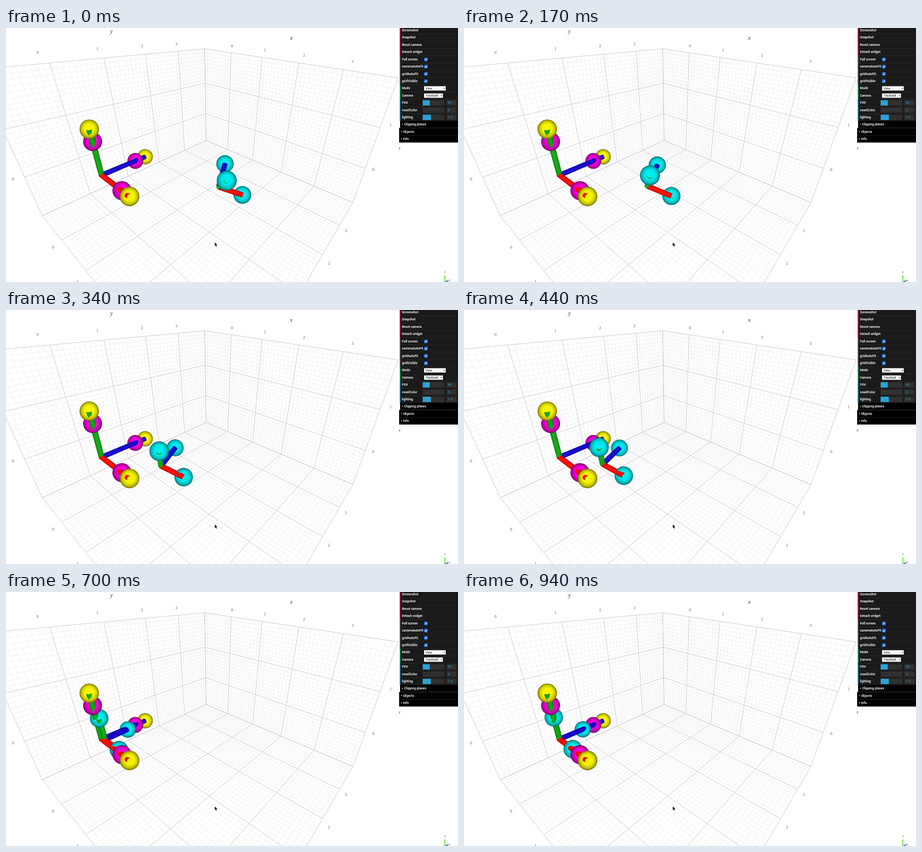
An HTML page with a canvas for the animation above (980 ms loop, 960 by 540 pixels).

```html
<!DOCTYPE html>
<html lang="en">
<head>
<meta charset="utf-8">
<title>Frame alignment</title>
<style>
  html, body { margin: 0; width: 100%; height: 100%; overflow: hidden; background: #fff; }
  canvas { position: absolute; left: 0; top: 0; }
</style>
</head>
<body>
<canvas id="scene" width="960" height="540"></canvas>
<canvas id="objects" width="960" height="540"></canvas>
<script>
const LOOP = 980, FOCAL = 523.5;
const scene = document.getElementById('scene').getContext('2d');
const objects = document.getElementById('objects').getContext('2d');

// Camera: world to view space, view space to screen
const rotate = ([x, y, z]) => [
  .778 * x + .627 * y + .038 * z,
  .337 * x - .3625 * y - .8687 * z,
  -.5296 * x + .69 * y - .493 * z
];
const add = (a, b, k = 1) => a.map((v, i) => v + b[i] * k);
const toView = p => add(rotate(p), [-2.607, .403, 4.929]);
const toScreen = ([x, y, z]) => [480 + FOCAL * x / z, 270 + FOCAL * y / z];
const cross = (a, b) => [a[1] * b[2] - a[2] * b[1], a[2] * b[0] - a[0] * b[2], a[0] * b[1] - a[1] * b[0]];
const unit = a => a.map(v => v / Math.hypot(...a));
const shade = (rgb, k) => `rgb(${rgb.map(v => v * k | 0)})`;

function path(ctx, points) {
  ctx.beginPath();
  points.forEach(p => ctx.lineTo(...p));
}

// Static scene: grid, labels, panel
function gridLines(step, skip, color, width) {
  scene.strokeStyle = color;
  scene.lineWidth = width;
  const line = (a, b) => { path(scene, [a, b].map(p => toScreen(toView(p)))); scene.stroke(); };
  for (let i = 0; i <= 5 / step; i++) {
    if (skip && i % skip === 0) continue;
    const k = i * step - 1;
    line([k, 4, -1], [k, -1, -1]);
    line([-1, k, -1], [4, k, -1]);
    line([k, 4, -1], [k, 4, 2]);
    line([-1, k, -1], [-1, k, 2]);
    if (k <= 2) {
      line([-1, 4, k], [4, 4, k]);
      line([-1, 4, k], [-1, -1, k]);
    }
  }
}

function text(str, x, y, font, color, align = 'left') {
  scene.font = font;
  scene.fillStyle = color;
  scene.textAlign = align;
  scene.textBaseline = 'middle';
  scene.fillText(str, x, y);
}

function box(x, y, w, h, color) {
  scene.fillStyle = color;
  scene.fillRect(x, y, w, h);
}

function drawLabels() {
  const labels = [
    [0, 67, 53], [1, 194, 45], [2, 289, 39], [3, 362, 35],
    [0, 480, 39], [1, 550, 48], [2, 633, 59], [3, 736, 72],
    [1, 817, 207], [0, 780, 302], [0, 15, 322],
    [3, 722, 432], [2, 686, 501], [0, 100, 467], [1, 152, 540]
  ];
  for (const [n, x, y] of labels) text(n, x, y, '8px "Liberation Serif", serif', '#444', 'center');
  const italic = size => `italic ${size}px "Liberation Serif", serif`;
  text('y', 224, 8, italic(12), '#333', 'center');
  text('x', 606, 22, italic(12), '#333', 'center');
  text('z', 836, 256, italic(9), '#333', 'center');

  scene.lineWidth = 2.5;
  scene.strokeStyle = '#7be84a';
  path(scene, [[932, 526], [932, 540]]);
  scene.stroke();
  scene.lineWidth = 2;
  scene.strokeStyle = '#3a3ae0';
  path(scene, [[931, 542], [939, 536.5]]);
  scene.stroke();
  text('z', 932.5, 519, italic(8), '#3c8a30', 'center');
  text('y', 941.5, 537, italic(8), '#445', 'center');
}

function drawCursor() {
  path(scene, [[443.5, 456], [443.5, 463.5], [445.2, 462], [446.6, 465], [447.8, 464.4], [446.5, 461.5], [448.8, 461.3]]);
  scene.closePath();
  scene.strokeStyle = '#fff';
  scene.lineWidth = 1;
  scene.stroke();
  scene.fillStyle = '#000';
  scene.fill();
}

function drawPanel() {
  const ROW = 15.42, FONT = '700 6.8px Roboto, sans-serif', BLUE = '#2fa1d6', FIELD = '#303030';
  const rows = ['Screenshot', 'Snapshot', 'Reset camera', 'Detach widget',
    'Full screen', 'cameraAutoFit', 'gridAutoFit', 'gridVisible',
    'Mode', 'Camera', 'FOV', 'voxelColor', 'lighting'];
  const accent = i => i < 4 ? '#e61d5f' : i < 8 ? '#806787' : i < 10 ? '#1ed36f' : BLUE;
  const selects = { Mode: ['View', 46], Camera: ['Trackball', 40] };
  const sliders = { FOV: [15, '60'], voxelColor: [0, '0'], lighting: [17.5, '1.5'] };

  box(836, 0, 124, 198, '#1a1a1a');
  rows.forEach((name, i) => {
    const y = 5 + i * ROW;
    box(836, y - 7.7, 1.7, ROW, accent(i));
    box(837.7, y + 7.2, 122.3, .7, '#2c2c2c');
    text(name, 841, y, FONT, '#eee');
    if (i > 3 && i < 8) {
      scene.fillStyle = '#1a74e0';
      scene.beginPath();
      scene.roundRect(888, y - 3.8, 7.6, 7.6, 1.3);
      scene.fill();
      scene.strokeStyle = '#fff';
      scene.lineWidth = 1.1;
      path(scene, [[889.8, y + .2], [891.3, y + 1.9], [893.9, y - 2]]);
      scene.stroke();
    }
    if (selects[name]) {
      const [value, w] = selects[name];
      box(888, y - 4.6, w, 9.2, '#fff');
      text(value, 891, y + .2, '6.6px Roboto, sans-serif', '#111');
      scene.strokeStyle = '#222';
      scene.lineWidth = 1;
      path(scene, [[883.2 + w, y - 1], [885 + w, y + 1], [886.8 + w, y - 1]]);
      scene.stroke();
    }
    if (sliders[name]) {
      const [fill, value] = sliders[name];
      box(885, y - 5.7, 46, 11.4, FIELD);
      box(885, y - 5.7, fill, 11.4, BLUE);
      box(935, y - 5.7, 22, 11.4, FIELD);
      text(value, 938.5, y, '6.8px Roboto, sans-serif', BLUE);
    }
  });

  box(837, 197.5, 123, 15, '#000');
  box(835, 212.5, 125, 31, '#000');
  box(835, 212.4, 125, .7, '#2c2c2c');
  box(835, 227.9, 125, .7, '#2c2c2c');
  [['Clipping planes', 841, 205.2], ['Objects', 839, 220.6], ['Info', 839, 236]].forEach(([name, x, y]) => {
    path(scene, [[x, y - 1.8], [x + 2.4, y - .4], [x, y + 1]]);
    scene.fillStyle = '#eee';
    scene.fill();
    text(name, x + 4.4, y, FONT, '#eee');
  });
}

// Moving objects
const RED = [255, 12, 4], GREEN = [16, 170, 20], BLUE = [24, 10, 215];
const YELLOW = [255, 250, 0], MAGENTA = [255, 0, 225], CYAN = [0, 242, 245];
const ROD_RADIUS = .049, BALL_RADIUS = .175, STRIPS = 9, SLICES = 40;

function ball(items, center, rgb) {
  const p = toView(center), [x, y] = toScreen(p), r = BALL_RADIUS * FOCAL / p[2];
  items.push({ depth: p[2], draw(ctx) {
    const g = ctx.createRadialGradient(x, y - r * .12, 0, x, y, r);
    g.addColorStop(0, shade(rgb, 1));
    g.addColorStop(.5, shade(rgb, .96));
    g.addColorStop(.8, shade(rgb, .78));
    g.addColorStop(1, shade(rgb, .45));
    ctx.fillStyle = g;
    ctx.beginPath();
    ctx.arc(x, y, r, 0, 7);
    ctx.fill();
  } });
}

// A hollow rod, cut into short lit strips so it can pass in front of and behind balls
function rod(items, base, axis, length, rgb) {
  const start = toView(base), dir = rotate(axis);
  const side = unit(cross(dir, add(start, dir, length / 2)));
  const front = cross(dir, side);
  const surface = (t, s) =>
    add(add(add(start, dir, t), side, s * ROD_RADIUS), front, Math.sqrt(1 - s * s) * ROD_RADIUS);

  for (let i = 0; i < STRIPS; i++) {
    const s = (2 * i + 1) / STRIPS - 1, color = shade(rgb, .5 + .5 * Math.sqrt(1 - s * s));
    for (let j = 0; j < SLICES; j++) {
      const a = surface(j / SLICES * length, s);
      const b = surface(Math.min(1, (j + 1.4) / SLICES) * length, s);
      items.push({ depth: (a[2] + b[2]) / 2, draw(ctx) {
        ctx.strokeStyle = color;
        ctx.lineWidth = 2 * ROD_RADIUS / STRIPS * FOCAL / a[2] + .35;
        path(ctx, [toScreen(a), toScreen(b)]);
        ctx.stroke();
      } });
    }
  }
}

// The three unit axes turned about one tilted axis
function turnedAxes(angle) {
  const pivot = unit([.53, .61, .59]), c = Math.cos(angle), s = Math.sin(angle);
  return [[1, 0, 0], [0, 1, 0], [0, 0, 1]].map((e, i) =>
    add(add(e.map(v => v * c), cross(pivot, e), s), pivot, pivot[i] * (1 - c)));
}

function triad(items, base, angle, length, balls) {
  turnedAxes(angle).forEach((axis, i) => {
    rod(items, base, axis, length, [RED, BLUE, GREEN][i]);
    for (const [at, rgb] of balls) ball(items, add(base, axis, at), rgb);
  });
}

function draw(now) {
  const step = Math.floor(now % LOOP * .03);
  const k = Math.max(0, 1 - step / 21.75);
  const items = [];
  triad(items, [0, 0, 0], 0, 1, [[.75, MAGENTA], [1, YELLOW]]);
  triad(items, [k * (2.11 - .11 * k), k * (.92 + .35 * k), 0], .92 * k, .5, [[.5, CYAN]]);
  items.sort((a, b) => b.depth - a.depth);
  objects.clearRect(0, 0, 960, 540);
  items.forEach(item => item.draw(objects));
  requestAnimationFrame(draw);
}

scene.fillStyle = '#fff';
scene.fillRect(0, 0, 960, 540);
gridLines(.1, 10, '#e9e9ee', .7);
gridLines(1, 0, '#c6c6ca', 1);
drawLabels();
drawPanel();
drawCursor();
requestAnimationFrame(draw);
</script>
</body>
</html>
```
